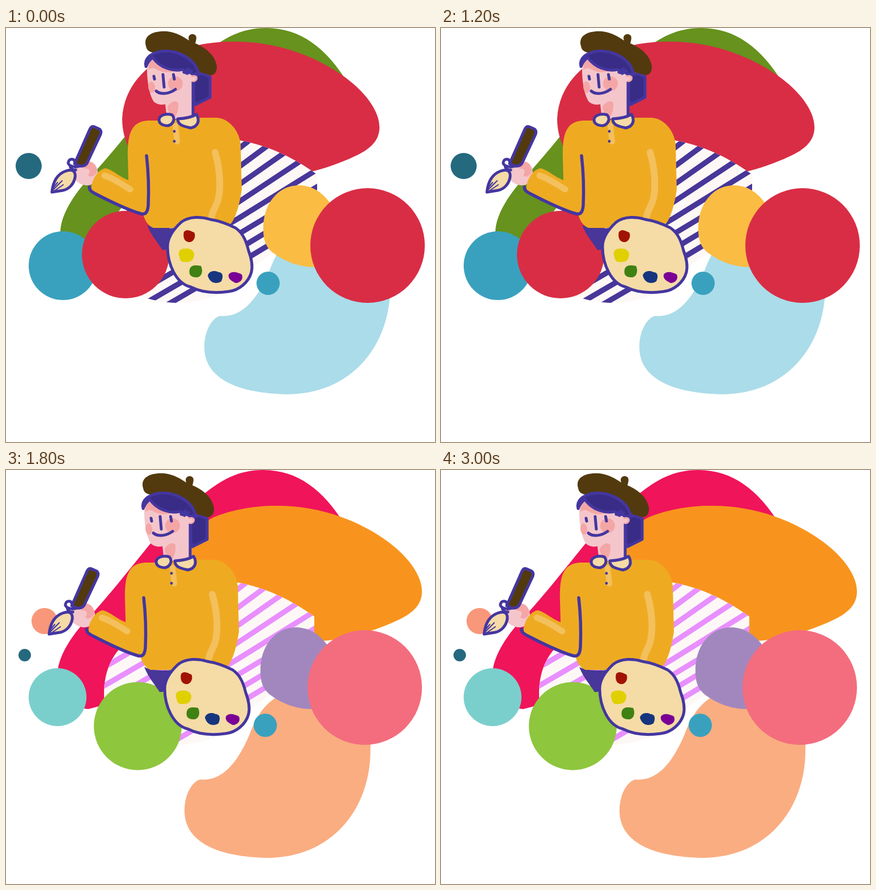
Animation, 757 px wide and 729 px high, one loop 3.6 s. Source, as an HTML page with a canvas:

```html
<!DOCTYPE html>
<html lang="en">
<head>
<meta charset="utf-8">
<title>Painter</title>
<style>
html, body { margin: 0; width: 100%; height: 100%; overflow: hidden; background: #fff; }
canvas { display: block; }
</style>
</head>
<body>
<canvas id="stage" width="757" height="729"></canvas>
<script>
const ctx = document.getElementById('stage').getContext('2d');
const HOLD = 600;
const INK = '#4436a0', BROWN = '#523a0e', SKIN = '#f4c6cb', BLUSH = '#f4a6a6';
const SHIRT = '#eeab22', SHINE = '#f3c05c', CREAM = '#f5dba6';

const palettes = [
  {
    shift: 0, back: '#66921d', swoosh: '#d92d45', swooshAt: [0, 0],
    stripe: '#483699', pool: '#abdce9', poolAt: [0, 0], pebble: '#fbbc43', big: '#d92d45',
    dots: [[40, 243, 23, '#25697f'], [100.5, 418.5, 60.5, '#39a1be'], [211, 399, 77, '#d92d45']]
  },
  {
    shift: -5, back: '#f0145a', swoosh: '#f8941d', swooshAt: [75, 39],
    stripe: '#e98fff', pool: '#faad81', poolAt: [-35, 38], pebble: '#a287be', big: '#f36d7e',
    dots: [[68, 266, 23, '#f9977a'], [33, 326, 11, '#25697f'], [91, 400, 51, '#7acfcc'], [232.5, 451, 77.5, '#8ec63d']]
  }
];

const shapes = {
  back: 'M459 0C415 0 385 18 357 40C325 65 295 92 262 127C225 172 180 230 143 268C112 303 96 335 96 360C98 395 120 418 150 421L185 412L300 300L520 220L604 98C565 35 520 0 459 0Z',
  swoosh: 'M400 24C480 23 550 51 600 88C640 118 659 150 659 175C659 200 640 215 615 226C590 238 560 248 535 254C480 268 430 262 380 255L260 270C225 235 205 200 205 160C208 100 250 65 290 45C320 32 360 24 400 24Z',
  cloth: 'M413 198C465 207 510 230 549 258V283C549 320 520 360 475 393L437 420C410 460 360 484 300 484C270 483 235 475 215 460C190 445 178 420 178 395C178 350 195 325 210 310C250 250 330 190 413 198Z',
  pool: 'M378 507C420 511 447 470 465 427C475 402 485 380 512 362L600 330C660 350 682 400 678 460C676 560 610 645 495 645C410 643 350 618 350 562C350 530 366 509 378 507Z',
  pebble: 'M454 355C453 310 480 277 517 277C545 278 560 292 575 312L545 421C515 421 490 410 470 395C458 385 454 372 454 355Z'
};
for (const key in shapes) shapes[key] = new Path2D(shapes[key]);

function fill(path, color) {
  ctx.fillStyle = color;
  ctx.fill(path instanceof Path2D ? path : new Path2D(path));
}

function line(path, width = 5, color = INK) {
  ctx.strokeStyle = color;
  ctx.lineWidth = width;
  ctx.stroke(new Path2D(path));
}

function outlined(path, color, width = 5) {
  fill(path, color);
  line(path, width);
}

function oval(x, y, rx, ry, color, turn = 0) {
  ctx.fillStyle = color;
  ctx.beginPath();
  ctx.ellipse(x, y, rx, ry, turn, 0, 2 * Math.PI);
  ctx.fill();
}

const disc = (x, y, r, color) => oval(x, y, r, r, color);

function at([x, y], draw) {
  ctx.save();
  ctx.translate(x, y);
  draw();
  ctx.restore();
}

// Stripes crowd together and flatten towards the bottom of the cloth.
function drawCloth(color) {
  fill(shapes.cloth, '#fdf8f6');
  ctx.save();
  ctx.clip(shapes.cloth);
  for (let i = 0; i < 8; i++) {
    const y = 213 + 33 * i - 0.6 * i * i;
    const rise = Math.max(0.6, 0.78 - 0.04 * i);
    line(`M560 ${y - 150 * rise}L410 ${y}L150 ${y + 260 * 0.58}`, 9.5, color);
  }
  ctx.restore();
}

function drawHead() {
  outlined('M331 86L346 80L360 86V122L334 135L331 126Z', '#392c86');
  fill('M249 62C248 90 252 116 261 130C267 135 276 136 281 134L284 160H330V62L270 46Z', SKIN);
  fill('M285 138C291 129 300 126 304 132C305 143 302 152 297 158C289 152 285 146 285 138Z', BLUSH);
  fill('M252 62L262 52C272 63 283 72 297 75C287 80 273 78 264 72Q257 68 251 74Z', BLUSH);
  disc(299, 98, 13, BLUSH);
  oval(257, 104, 6, 10, BLUSH, -0.1);
  fill('M247 32C241 12 262 4 285 6C301 8 314 16 323 22C320 14 325 10 331 11C338 13 336 20 334 27C353 35 369 48 372 67C373 79 365 86 357 82L330 74L300 46L258 43C251 41 248 38 247 32Z', BROWN);
  outlined('M247 68C243 53 257 44 274 41C300 38 322 50 334 66L340 80L330 82L323 77L317 79L312 73C293 77 272 70 259 52C252 57 249 62 247 68Z', '#392c86');
  line('M330 95V154');
  fill('M325 86C329 81 338 83 338 88C338 94 332 96 327 94Z', SKIN);
  line('M328 85Q337 83 336 90Q335 94 330 94', 2.5, BLUSH);
  line('M314 78L322 72M320 80L327 75');
  line('M261 85L262 90M295.500 82L297 90M277 82L279 104M265 111C273 118 288 116 299 108');
}

function drawBrush() {
  fill('M124 246C132 237 145 232 155 239C164 247 164 262 157 271C149 280 135 278 126 271C117 265 117 253 124 246Z', SKIN);
  fill('M140 236C151 232 160 240 161 252C157 262 148 264 145 259C151 251 145 246 138 248Z', BLUSH);
  outlined('M81 289C83 270 91 257 105 252C116 248 123 251 122 262C120 275 111 284 100 286Z', CREAM);
  line('M83 285L99 269M85 287L101 276M82 283L91 272', 2);
  outlined('M148 178Q151 172 156 174L165 178Q169 181 167 187L143 238Q139 244 131 243L121 239Z', BROWN);
  line('M130 243C121 247 108 242 110 236C112 229 121 230 121 235M113 243Q114 250 123 250');
}

function drawBody() {
  fill('M249 347C265 354 285 354 304 351L291 365L289 390L276 391C268 378 256 365 249 347Z', '#483699');
  fill('M215 230C214 190 219 165 250 163H285L345 158H372C398 160 413 187 414 205L416 285C412 310 406 335 395 347L340 335L300 352H260C249 347 245 338 242 328C210 320 180 304 153 290C146 280 157 250 176 247C190 251 202 263 216 268Z', SHIRT);
  line('M174 260C190 265 204 275 219 284', 11, SHINE);
  line('M369 219C378 250 379 280 375 299C372 314 364 320 362 336', 12, SHINE);
  line('M299 172L302 200', 10, SHINE);
  disc(297, 182, 2.4, INK);
  disc(297, 199.5, 2.4, INK);
  line('M248 225C252 260 252 290 251 312C250 325 246 329 238 327C210 319 180 303 158 292C150 288 147 285 147 280', 5.5);
}

function drawCollar() {
  outlined('M270 162C270 153 283 150 293 153C299 159 296 169 286 172C276 172 270 168 270 162Z', CREAM);
  outlined('M303 160Q324 159 336 152C342 162 340 173 326 176C313 173 303 171 303 160Z', CREAM);
}

function drawPalette() {
  outlined('M285 385C285 368 296 354 309 342C323 331 345 332 360 337C380 340 395 347 405 352C420 362 425 380 428 392C433 405 436 417 433 430C428 448 411 462 393 464C366 468 344 465 326 456C300 450 285 416 285 385Z', CREAM);
  fill('M314 359C319 353 325 357 332 360C336 367 331 377 324 377C314 377 312 367 314 359Z', '#a11205');
  fill('M305 400C303 389 314 387 324 389C333 393 333 399 331 404C329 413 319 412 312 412C306 410 307 404 305 400Z', '#e0d000');
  fill('M324 425C326 417 335 417 344 419C348 427 346 437 338 439C326 440 322 434 324 425Z', '#3f8113');
  fill('M356 436C358 428 368 426 375 430C384 430 383 440 380 446C373 451 360 451 356 436Z', '#17357f');
  fill('M393 434C398 427 408 430 416 434C420 443 412 449 405 449C399 446 391 442 393 434Z', '#7a0096');
}

function drawScene(p) {
  ctx.fillStyle = '#fff';
  ctx.fillRect(0, 0, 757, 729);
  ctx.lineCap = ctx.lineJoin = 'round';
  const base = [p.shift, 0];
  at(base, () => fill(shapes.back, p.back));
  at(p.swooshAt, () => fill(shapes.swoosh, p.swoosh));
  at(base, () => drawCloth(p.stripe));
  p.dots.forEach(d => disc(...d));
  at(p.poolAt, () => fill(shapes.pool, p.pool));
  at(base, () => {
    fill(shapes.pebble, p.pebble);
    disc(638, 383, 101, p.big);
    disc(462.5, 449.5, 20.5, '#39a1be');
    drawHead();
    drawBrush();
    drawBody();
    drawCollar();
    drawPalette();
  });
}

const start = performance.now();
function tick() {
  const elapsed = performance.now() - start;
  drawScene(palettes[Math.floor(elapsed / HOLD) % palettes.length]);
  requestAnimationFrame(tick);
}
tick();
</script>
</body>
</html>
```
